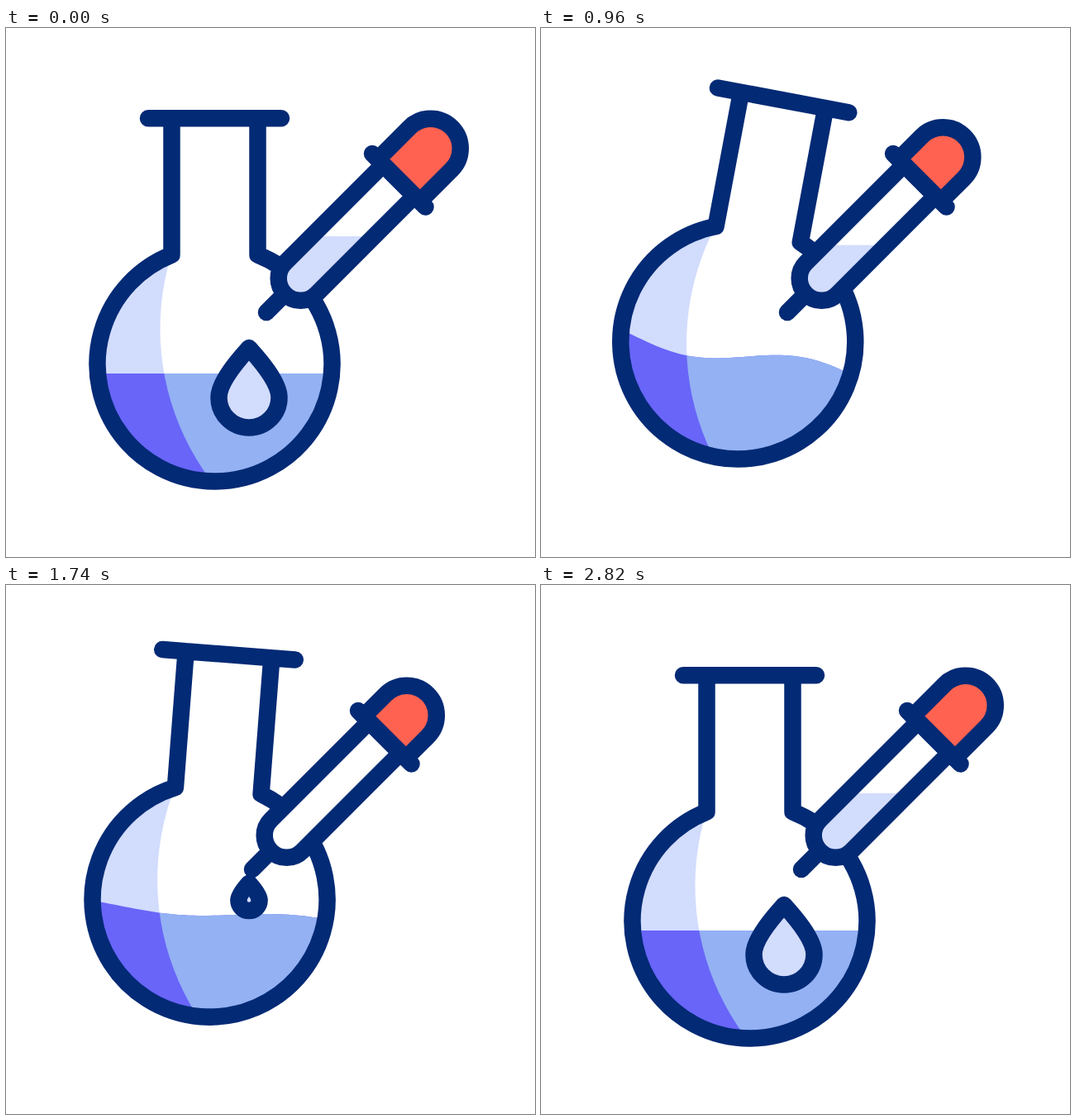
An HTML page that plays this animation: 640x640 px, repeating every 3020 ms.

```html
<!DOCTYPE html>
<html lang="en">
<head>
<meta charset="utf-8">
<title>Flask and dropper</title>
<style>
  html, body { margin: 0; width: 100%; height: 100%; overflow: hidden; background: #fff; }
  svg { display: block; width: 100vw; height: 100vh; }
  .line { fill: none; stroke: #032a75; stroke-width: 20.5; stroke-linecap: round; stroke-linejoin: round; }
  .pale { fill: #d2dcfd; }
  .white { fill: #fff; }
</style>
</head>
<body>
<svg viewBox="0 0 640 640">
  <defs>
    <path id="glass" transform="translate(356.5 303) rotate(-45)" d="M168-26.8H0A26.8 26.8 0 0 0 0 26.8H168"/>
    <clipPath id="tube"><use href="#glass"/></clipPath>
    <clipPath id="bowl"><circle cx="252.5" cy="406.5" r="140"/></clipPath>
    <clipPath id="lit"><circle cx="491.5" cy="364" r="305"/></clipPath>
  </defs>

  <g id="flask">
    <g clip-path="url(#bowl)">
      <rect class="pale" x="100" y="260" width="105" height="220"/>
      <circle class="white" cx="491.5" cy="364" r="305"/>
      <path class="liquid" fill="#6865f8"/>
      <g clip-path="url(#lit)"><path class="liquid" fill="#93b1f3"/></g>
    </g>
    <path class="line" d="M172 109.3H333M200.5 109.3V274.4A142 142 0 1 0 304.5 274.4V109.3"/>
  </g>

  <g id="drop">
    <path class="line" style="fill:#d2dcfd" vector-effect="non-scaling-stroke"
      d="M0-60C-9-50-36.5-20-36.5 0A36.5 36.5 0 0 0 36.5 0C36.5-20 9-50 0-60Z"/>
  </g>

  <g id="dropper">
    <path class="line" d="M315 344L345 314"/>
    <use href="#glass" class="white"/>
    <g clip-path="url(#tube)"><rect id="level" class="pale" x="300" width="240" height="200"/></g>
    <use href="#glass" class="line"/>
    <g transform="translate(356.5 303) rotate(-45)">
      <path id="bulb" class="line" style="fill:#ff6250"/>
      <path class="line" d="M168-45.6V45.6"/>
    </g>
  </g>
</svg>
<script>
const LOOP = 3020;
const $ = id => document.getElementById(id);
const liquids = document.querySelectorAll('.liquid');
const place = (id, value) => $(id).setAttribute('transform', value);

// Smooth rise from 0 to 1 between two times
function ramp(t, start, end) {
  const u = Math.min(1, Math.max(0, (t - start) / (end - start)));
  return u * u * (3 - 2 * u);
}
const pulse = (t, start, peak, end) => ramp(t, start, peak) - ramp(t, peak, end);

// Surface height for a full tilt to the right, x measured from the flask axis
const wave = x => 4.5 - 17 * Math.sin(Math.PI * (x - 9) / 138);

function drawFlask(t) {
  const right = pulse(t, 200, 810, 1410) + pulse(t, 1410, 1982, 2575);
  const left = pulse(t, 810, 1410, 1982);
  const lift = 25.7 * (ramp(t, 200, 800) - ramp(t, 2000, 2600));
  place('flask', `translate(0 ${-lift}) rotate(${15 * right - 12.6 * left} 252.5 329.5)`);

  let surface = 'M400 560H105';
  for (let x = -144; x <= 144; x += 6) {
    surface += `L${252.5 + x} ${418 + right * wave(x) + left * wave(-x)}`;
  }
  liquids.forEach(path => path.setAttribute('d', surface + 'Z'));
}

function drawDrop(t) {
  const falling = t < 1100;
  const size = falling ? 1 : .185 + .815 * ramp(t, 1400, 2600);
  const y = falling ? 447 + 51 * ramp(t, 200, 800) : 347 + 100 * size;
  place('drop', `translate(294 ${y}) scale(${size})`);
  $('drop').setAttribute('opacity', 1 - ramp(t, 200, 800) + ramp(t, 1400, 1700));
}

function drawDropper(t) {
  place('dropper', `translate(${17 * (ramp(t, 2200, 2800) - ramp(t, 200, 800))} 0)`);
  const press = pulse(t, 200, 800, 1400);
  const squeeze = 12.7 * (press + pulse(t, 1400, 1800, 2170));
  const end = 222.4 - squeeze * Math.SQRT2;
  $('bulb').setAttribute('d', `M168-36H${end}A36 36 0 0 1 ${end} 36H168Z`);
  const drained = ramp(t, 1400, 1800) - ramp(t, 2400, 2800);
  $('level').setAttribute('y', 252 + 12.9 * press + 78 * drained);
}

function frame() {
  const t = performance.now() % LOOP;
  drawFlask(t);
  drawDrop(t);
  drawDropper(t);
  requestAnimationFrame(frame);
}
frame();
</script>
</body>
</html>
```
